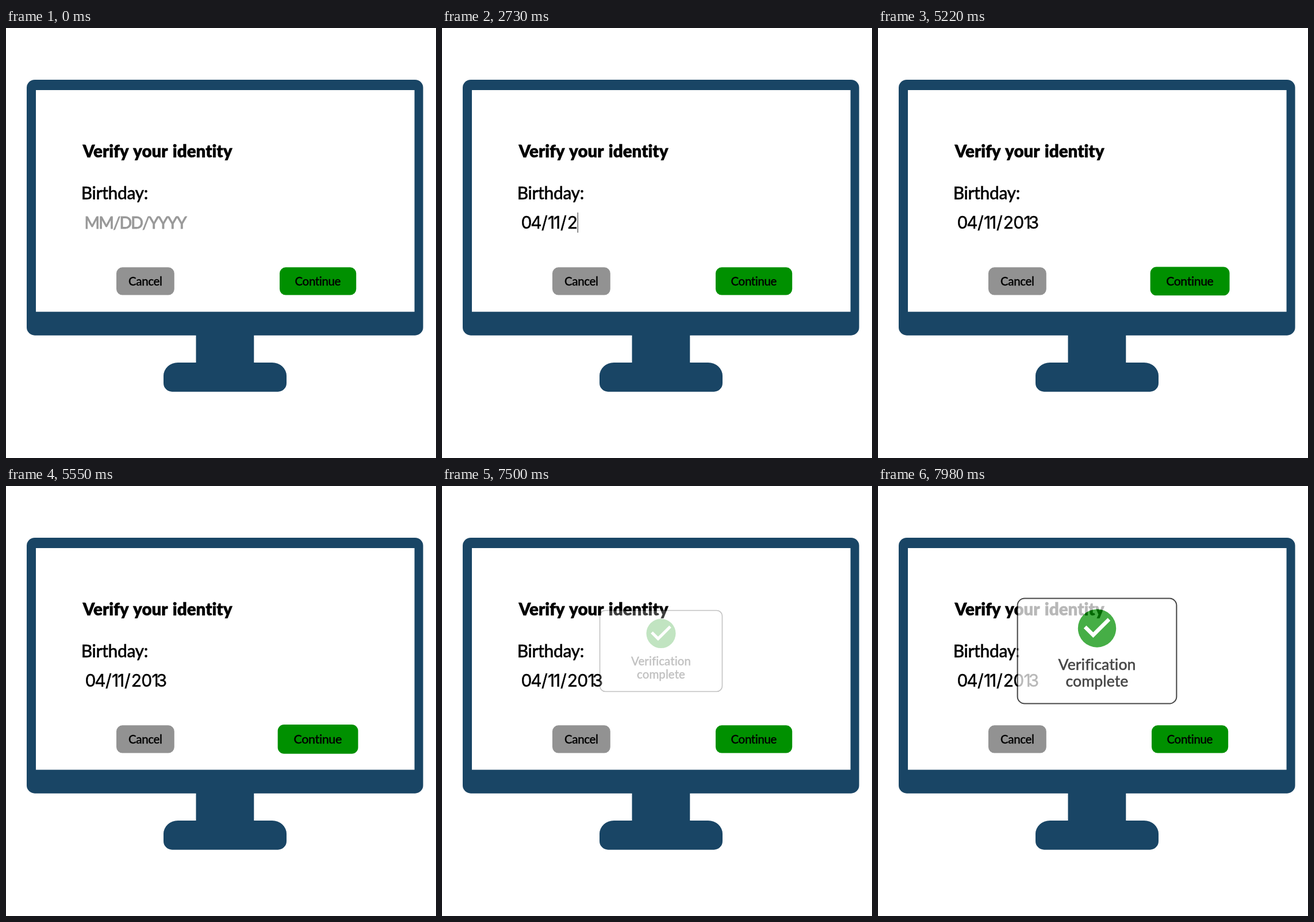
An HTML page that plays this animation: 748 by 748 pixels, repeating every 8 s.

```html
<!DOCTYPE html>
<html lang="en">
<head>
<meta charset="utf-8">
<title>Verify your identity</title>
<style>
  html, body { margin: 0; width: 100%; height: 100%; overflow: hidden; background: #fff; }
  svg { display: block; width: 100vw; height: 100vh; }
  text { font-family: Lato, "Open Sans", sans-serif; font-weight: 500; font-variant-ligatures: none; stroke: #000; stroke-width: .45px; }
  .mid { text-anchor: middle; }
  .label { font-size: 20.5px; letter-spacing: -.4px; stroke-width: .3px; }
  .note { font-size: 30px; letter-spacing: .1px; }
  #title { font-size: 29.5px; font-weight: 900; letter-spacing: 0; word-spacing: 2px; }
  #field { font-size: 30px; letter-spacing: -.4px; }
  #hint { font-size: 28.5px; letter-spacing: -1.75px; fill: #999; stroke: #999; stroke-width: .8px; }
  #typed { font-family: Inter, "Open Sans", sans-serif; font-size: 30px; font-weight: 400; text-anchor: middle; }
</style>
</head>
<body>
<svg viewBox="0 0 748 748">
  <rect width="748" height="748" fill="#fff"/>
  <g fill="#194565">
    <rect x="36" y="90" width="689.6" height="444.7" rx="14"/>
    <rect x="330.5" y="530" width="100.8" height="56"/>
    <path d="M299 582H463a25 23 0 0 1 25 23V617.7a15 15 0 0 1 -15 15H289a15 15 0 0 1 -15 -15V605a25 23 0 0 1 25 -23Z"/>
  </g>
  <rect x="52" y="108" width="658.6" height="385.6" fill="#fff"/>

  <text id="title" x="133.5" y="225">Verify your identity</text>
  <text id="field" x="130.8" y="298">Birthday:</text>
  <text id="hint" x="136.5" y="349">MM/DD/YYYY</text>
  <text id="typed" y="349"></text>
  <rect id="caret" y="321" width="1" height="35" fill="#222"/>

  <rect x="192" y="416.3" width="100.8" height="48.2" rx="10.5" fill="#929292"/>
  <text class="mid label" x="242.3" y="447.5">Cancel</text>
  <g id="go">
    <rect x="476" y="416.3" width="133.2" height="48.2" rx="10.5" fill="#009000"/>
    <text class="mid label" x="542.3" y="447.5">Continue</text>
  </g>

  <g id="card">
    <rect x="224.7" y="183.6" width="312.6" height="206.8" rx="14" fill="#fff" stroke="#000" stroke-width="2.3"/>
    <circle cx="381" cy="242.3" r="37.5" fill="#009000"/>
    <path d="M373.5 261L354.8 242.3L360 237L373.5 250.4L402 222L407.2 227.3Z" fill="#fff"/>
    <text class="mid note" x="381" y="324">Verification</text>
    <text class="mid note" x="381" y="357">complete</text>
  </g>
</svg>
<script>
const LOOP = 8000, STEP = 30;
const DATE = "04/11/2013";
const KEYS = [1680, 1830, 2070, 2190, 2430, 2640, 2730, 2940, 3090, 3240];
const GLYPH_X = [147, 164, 178.5, 190, 200, 211.5, 227, 244.7, 259.5, 270.7];
const CARET_X = [138, 157, 172, 186, 195.5, 205, 219, 235.7, 254, 262.5, 278.7];

const el = id => document.getElementById(id);
const [hint, typed, caret, go, card] = ["hint", "typed", "caret", "go", "card"].map(el);
const ramp = (t, start, len) => Math.min(1, Math.max(0, (t - start) / len));
const zoom = (node, x, y, s) =>
  node.setAttribute("transform", `translate(${x} ${y}) scale(${s}) translate(${-x} ${-y})`);

typed.setAttribute("x", GLYPH_X.join(" "));

function caretAlpha(t) {
  if (t >= 5220) return 0;
  return ramp(t, 1110, 480) * (1 - Math.min(.94, ramp(t, 3360, 480)));
}

// quick swell, slow return
function pulse(t) {
  if (t < 5320) return Math.sin(ramp(t, 5190, 130) * Math.PI / 2);
  return (1 - ramp(t, 5320, 780)) ** 2;
}

// grows past its resting size, then shrinks back
function cardScale(t) {
  const peak = 326 / 314;
  if (t < 7806) return peak * Math.sin(ramp(t, 7244, 562) * Math.PI / 2);
  return peak - .153 * ramp(t, 7806, 174) ** 2;
}

function draw(time) {
  const t = Math.floor(time / STEP) * STEP;
  const count = KEYS.filter(k => t >= k).length;

  hint.setAttribute("opacity", 1 - ramp(t, 1110, 480));
  typed.textContent = DATE.slice(0, count);
  caret.setAttribute("x", CARET_X[count]);
  caret.setAttribute("opacity", caretAlpha(t));

  zoom(go, 542.6, 440.4, 1 + .1 * pulse(t));
  zoom(card, 381, 287, cardScale(t));
  card.setAttribute("opacity", ramp(t, 7260, 1000));
}

const begin = performance.now();
function tick() {
  draw((performance.now() - begin) % LOOP);
  requestAnimationFrame(tick);
}
tick();
</script>
</body>
</html>
```
